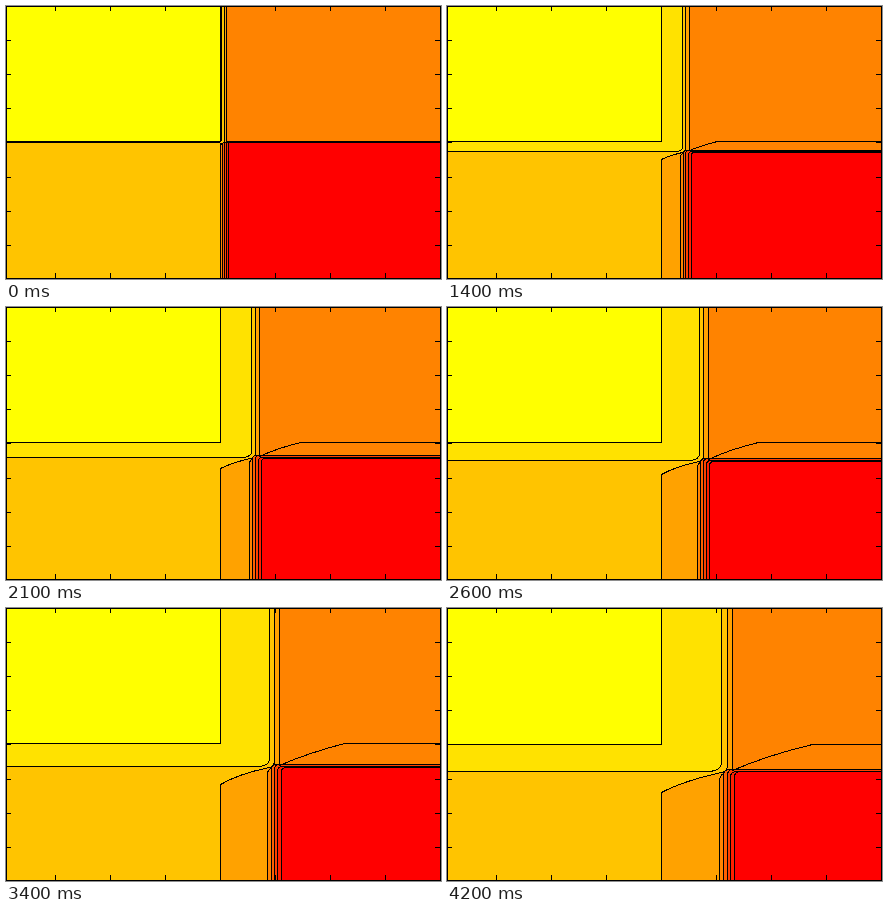
An HTML page for the animation above (4.3 s loop, 435 by 273 pixels).

```html
<!DOCTYPE html>
<html lang="en">
<head>
<meta charset="utf-8">
<title>Contour fronts</title>
<style>
html, body { margin: 0; width: 100%; height: 100%; overflow: hidden; background: #ff0; }
svg { display: block; width: 435px; height: 273px; }
</style>
</head>
<body>
<svg viewBox="0 0 435 273" shape-rendering="crispEdges" stroke="#000" fill="none">
  <g id="bands"></g>
  <path id="slip"/>
  <path id="axes"/>
</svg>
<script>
const W = 435, H = 273, X0 = 214, STEP = 100, STEPS = 43;
const colors = ['#ffe200', '#ffc400', '#ffa200', '#ff8300', '#ff6000', '#ff4000', '#ff2000', '#ff0000'];
const group = document.getElementById('bands');
const slip = document.getElementById('slip');

const bands = colors.map(color => {
  const path = document.createElementNS('http://www.w3.org/2000/svg', 'path');
  path.setAttribute('fill', color);
  group.appendChild(path);
  return path;
});

const px = v => Math.round(v) + 0.5;
const pt = (x, y) => px(x) + ' ' + px(y);
const mix = (a, b, f) => a + (b - a) * f;

function drawAxes() {
  let d = `M.5 .5H${W - 0.5}V${H - 0.5}H.5Z`;
  for (let i = 0; i < 7; i++) {
    const x = 49.5 + 55 * i;
    const y = px(34.1 * (i + 1));
    d += `M${x} 0v5M${x} ${H}v-6M0 ${y}h5M${W} ${y}h-6`;
  }
  document.getElementById('axes').setAttribute('d', d);
}

function draw(n) {
  const s = 136.45 + 0.635 * n;      // horizontal front
  const y0 = 135 + 0.013 * n;
  const bend = 2 + 0.18 * n;
  const spread = Math.min(1, n / 7);
  const top = [0, 1, 2].map(i => mix(214.8 + 1.42 * n, 220.2 + 1.55 * n, i / 2));
  const low = [0, 1, 2, 3, 4].map(i => mix(213.6 + 1.4 * n, 222 + 1.55 * n, i / 4));
  const right = [-0.5 - 0.04 * n, 0, 1.1 - 0.018 * n].map(d => s + d * spread);
  const corner = 222.3 + 3.4 * n;
  const leftY = 137.8 + 1.11 * n;
  const midX = (low[0] + low[1]) / 2;
  const far = W + 3, deep = H + 3;

  const rightFront = (x, y) =>
    `M${pt(x, deep)}L${pt(x, y + bend * 0.6)}Q${pt(x, y)} ${pt(x + bend * 0.6, y)}L${pt(far, y)}L${pt(far, deep)}Z`;

  const shapes = [
    `M${pt(X0, -3)}L${pt(X0, y0)}L${pt(-3, y0)}L${pt(-3, deep)}L${pt(far, deep)}L${pt(far, -3)}Z`,

    `M${pt(top[0], -3)}L${pt(top[0], s - bend)}Q${pt(top[0], s - 1)} ${pt(top[0] - bend * 1.3, s)}` +
    `L${pt(-3, s)}L${pt(-3, deep)}L${pt(far, deep)}L${pt(far, -3)}Z`,

    `M${pt(top[1], -3)}L${pt(top[1], s - bend * 0.7)}Q${pt(top[1], s)} ${pt(midX, s + 1)}` +
    `Q${pt(mix(X0, midX, 0.38), mix(leftY, s, 0.58))} ${pt(X0, leftY)}` +
    `L${pt(X0, deep)}L${pt(far, deep)}L${pt(far, -3)}Z`,

    `M${pt(top[2], -3)}L${pt(top[2], s - bend * 0.5)}Q${pt(top[2], s)} ${pt(mix(low[0], top[2], 0.5), s + 1)}` +
    `Q${pt(low[0], s + 2)} ${pt(low[0], s + bend)}L${pt(low[0], deep)}L${pt(far, deep)}L${pt(far, -3)}Z`,

    rightFront(low[1], right[0]),
    rightFront(low[2], right[0]),
    rightFront(low[3], right[1]),
    rightFront(low[4], right[2])
  ];
  bands.forEach((band, i) => band.setAttribute('d', shapes[i]));

  const startX = top[2], startY = s - 1;
  slip.setAttribute('d',
    `M${pt(startX, startY)}` +
    `Q${pt(mix(startX, corner, 0.42), mix(startY, y0, 0.58))} ${pt(corner, y0)}L${pt(W, y0)}`);
}

drawAxes();
let shown = -1;
const begin = performance.now();
function tick() {
  const n = Math.floor(Math.max(0, performance.now() - begin) / STEP) % STEPS;
  if (n !== shown) draw(shown = n);
  requestAnimationFrame(tick);
}
tick();
</script>
</body>
</html>
```
